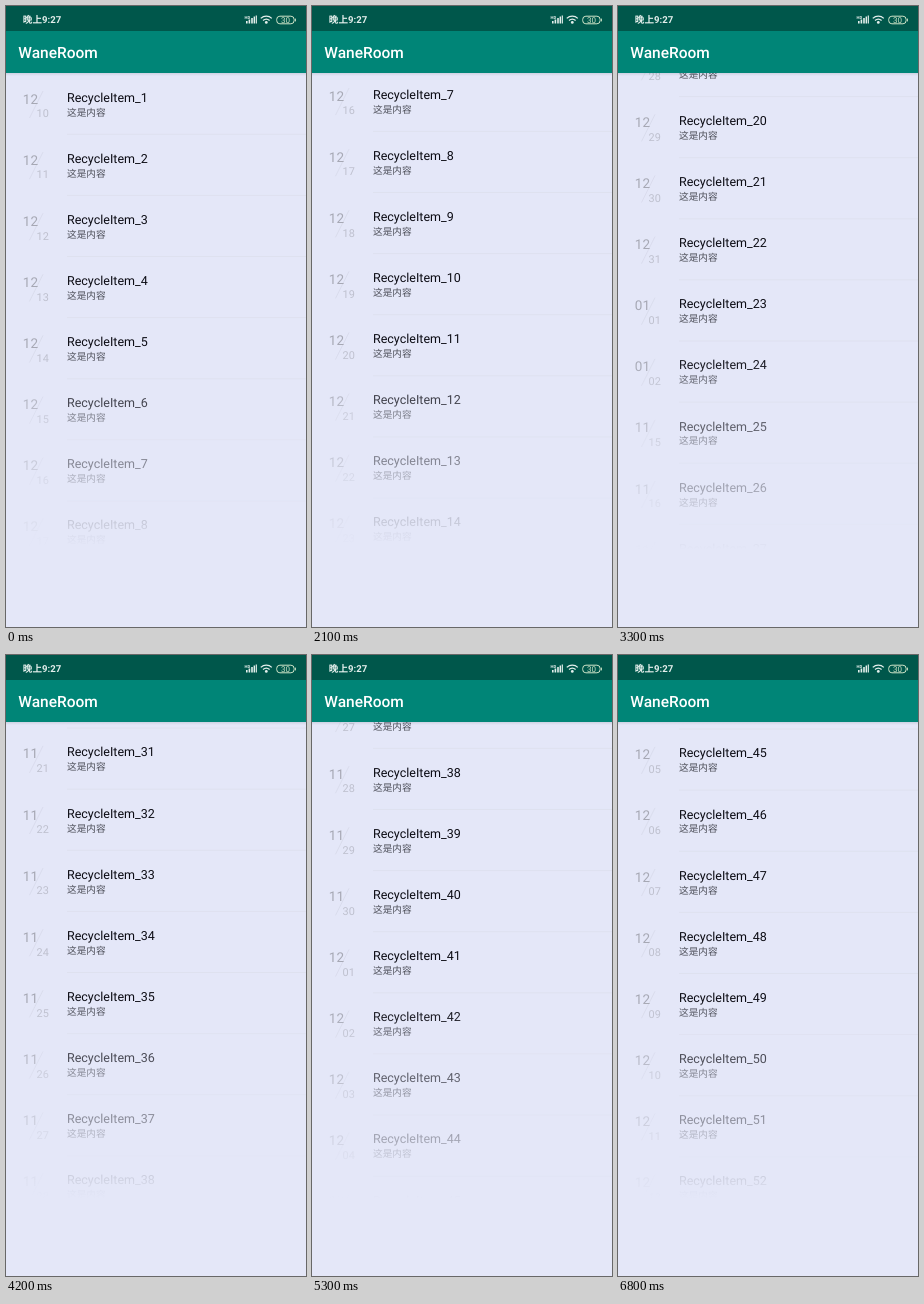
These frames come from a looping animation (300x621 px, 6.9 s). An HTML page:

```html
<!DOCTYPE html>
<html lang="zh-CN">
<head>
<meta charset="utf-8">
<style>
  html, body { margin: 0; width: 100%; height: 100%; overflow: hidden; background: #e4e7f8; }
  svg {
    position: absolute; left: 0; display: block;
    font-family: Roboto, "Noto Sans CJK SC", "Noto Sans CJK", sans-serif;
    text-rendering: geometricPrecision;
  }
  #list {
    top: 67px;
    -webkit-mask-image: linear-gradient(#000 278px, transparent 476px);
    mask-image: linear-gradient(#000 278px, transparent 476px);
  }
  #bars { top: 0; }
  .title { font-size: 12.5px; fill: #0c0c14; }
  .sub { font-size: 9.7px; fill: #4c4e58; }
  .month { font-size: 13.5px; fill: #a6a8b4; }
  .day { font-size: 10.9px; fill: #bec0ce; }
  .slash { stroke: #d7daea; stroke-width: .8; }
  .rule { stroke: #dee1ef; stroke-width: 1; }
</style>
</head>
<body>
<svg id="list" width="300" height="554"><g id="rows"></g></svg>
<svg id="bars" width="300" height="72">
  <defs>
    <linearGradient id="shade" x2="0" y2="1">
      <stop stop-color="#234" stop-opacity=".12"/>
      <stop offset="1" stop-color="#234" stop-opacity="0"/>
    </linearGradient>
  </defs>
  <rect y="67" width="300" height="3" fill="url(#shade)"/>
  <rect width="300" height="67" fill="#008577"/>
  <rect width="300" height="25" fill="#00574b"/>
  <text x="12.3" y="52" font-size="15.5" font-weight="500" fill="#fff">WaneRoom</text>
  <g fill="#e4efec">
    <text x="16.8" y="17.3" font-size="9.6" font-weight="700">晚上9:27</text>
    <text x="238.6" y="12.8" font-size="4.2" font-weight="700">HD</text>
    <path d="M240 15h1.6v2.5h-1.6zM242.6 13.6h1.6v3.9h-1.6zM245.2 12h1.6v5.5h-1.6zM247.6 10.6h1.4v6.9h-1.4zM249.7 9.5h1.2v8h-1.2z"/>
    <circle cx="260.3" cy="16.4" r="1.4"/>
  </g>
  <g fill="none" stroke="#e4efec" stroke-width="1.3">
    <path d="M254.8 12.4a8 8 0 0 1 11 0M257 14.6a5 5 0 0 1 6.6 0"/>
    <g stroke="#cfe4c8" stroke-width="1">
      <rect x="270.7" y="10.2" width="17.4" height="7.6" rx="3.2"/>
      <path d="M289.4 12.6v2.8"/>
    </g>
  </g>
  <text x="279.5" y="16.8" font-size="8" text-anchor="middle" fill="#cfe4c8">30</text>
</svg>
<script>
const PITCH = 61.11, LOOP = 6900;

// scroll position: [ms, px]
const KEYS = [
  [0, 0], [800, 0], [1400, 132], [2100, 369.6], [3300, 1137.7], [3700, 1197],
  [3800, 1197], [4200, 1827.4], [5300, 2234.9], [6700, 2680.5], [6800, 2682], [LOOP, 2682]
];
const slope = i => (KEYS[i + 1][1] - KEYS[i][1]) / (KEYS[i + 1][0] - KEYS[i][0]);
const tangents = KEYS.map((_, i) => {
  if (!i || i === KEYS.length - 1) return 0;
  const a = slope(i - 1), b = slope(i);
  return a * b > 0 ? 2 * a * b / (a + b) : 0;
});

function scrollAt(t) {
  let i = 0;
  while (t >= KEYS[i + 1][0]) i++;
  const [t0, y0] = KEYS[i], [t1, y1] = KEYS[i + 1];
  const h = t1 - t0, u = (t - t0) / h, v = 1 - u;
  return v * v * ((1 + 2 * u) * y0 + u * h * tangents[i]) +
         u * u * ((1 + 2 * v) * y1 - v * h * tangents[i + 1]);
}

const two = n => String(n).padStart(2, "0");

function row(n) {
  const date = n < 25 ? new Date(2018, 11, n + 9) : new Date(2018, 10, n - 10);
  return `<g transform="translate(0 ${(n - 1) * PITCH})">
    <path class="slash" d="M37 18L23.5 45"/>
    <text class="month" x="16.8" y="30.5">${two(date.getMonth() + 1)}</text>
    <text class="day" x="30.6" y="44.3">${two(date.getDate())}</text>
    <text class="title" x="61" y="28.6">RecycleItem_${n}</text>
    <text class="sub" x="61" y="42.5">这是内容</text>
    <path class="rule" d="M61 61.3H300"/>
  </g>`;
}

const rows = document.getElementById("rows");
rows.innerHTML = Array.from({ length: 54 }, (_, i) => row(i + 1)).join("");

function draw(now) {
  const t = Math.floor(now % LOOP / 100) * 100;
  rows.setAttribute("transform", `translate(0 ${-scrollAt(t).toFixed(2)})`);
  requestAnimationFrame(draw);
}
draw(0);
</script>
</body>
</html>
```
